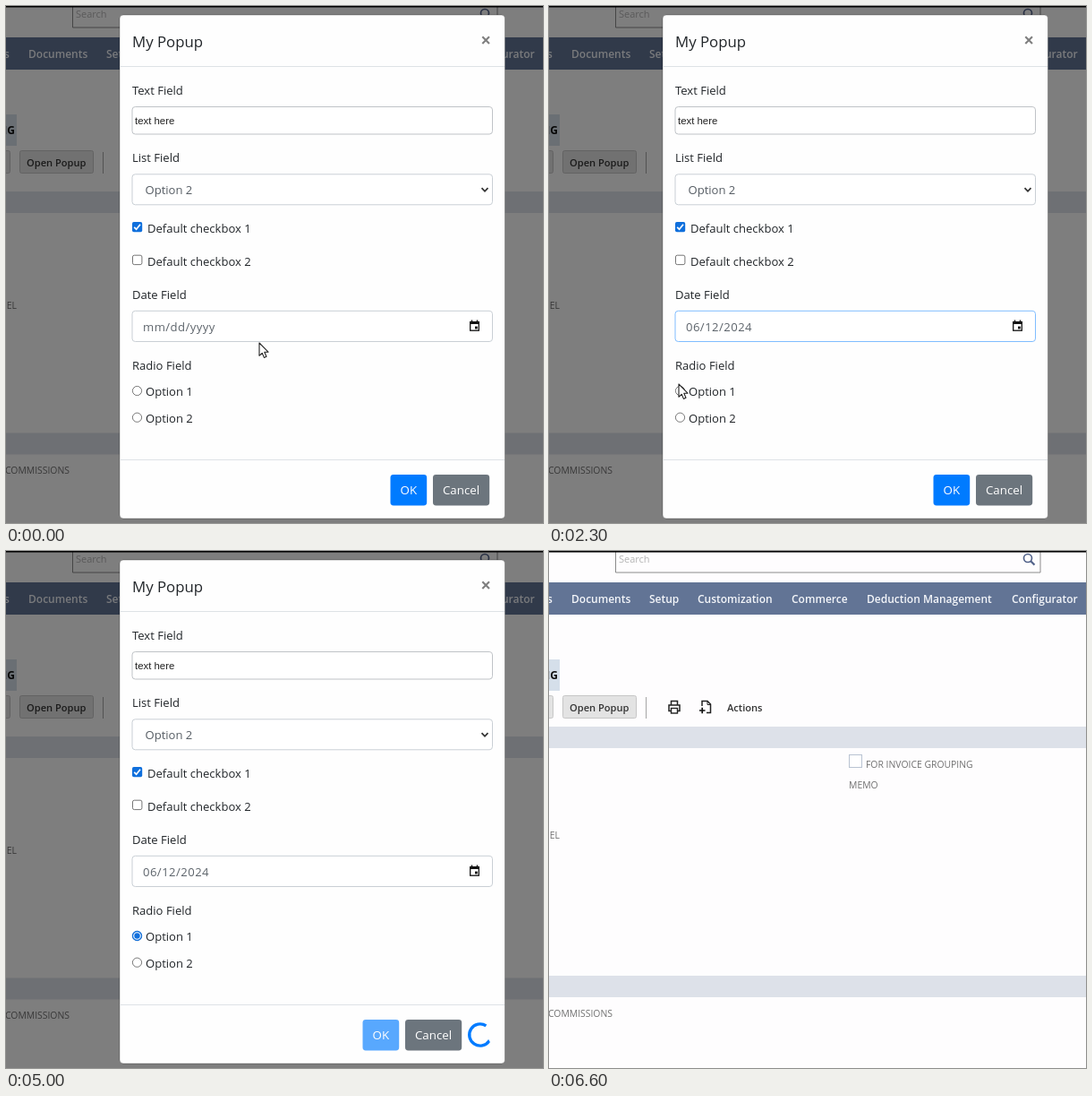
These frames come from a looping animation (600 px wide and 577 px high, 7.4 s). An HTML page:

```html
<!DOCTYPE html>
<html lang="en">
<head>
<meta charset="utf-8">
<title>Popup form</title>
<style>
  html, body { margin: 0; width: 100%; height: 100%; overflow: hidden; background: #fff; }
  svg { display: block; width: 600px; height: 577px; }
  text { white-space: pre; font-family: "Open Sans", "Noto Sans", sans-serif; }
  .end { text-anchor: end; }
  .mid { text-anchor: middle; }
  .nav { font-size: 12px; font-weight: 600; fill: #f4f6fa; }
  .tool { font-size: 11.1px; font-weight: 600; fill: #333; }
  .cap { font-size: 10.4px; fill: #707070; }
  .tab { font-size: 12px; font-weight: 700; fill: #111; }
  .search { font-size: 11px; fill: #b4b4b4; }
  .lbl { font-size: 13.05px; fill: #212529; }
  .val { font-size: 13.05px; fill: #565d64; }
  .date { font-size: 13.1px; letter-spacing: .45px; fill: #5d646b; }
  .title { font-size: 16.8px; font-weight: 500; fill: #212529; }
  .btn { font-size: 13.3px; fill: #fff; }
  .arial { font: 11.4px "Liberation Sans", Arial, sans-serif; fill: #222; }
  .day { font: 10.8px "Liberation Sans", Arial, sans-serif; fill: #111; text-anchor: middle; }
  .out { fill: #858585; }
  .month { font: bold 10.6px "Liberation Sans", Arial, sans-serif; fill: #111; }
</style>
</head>
<body>
<svg id="stage" viewBox="0 0 600 577"></svg>
<script>
const LOOP = 7400, STEP = 100;
const OPEN = 600, PICK = 1400, CLOSE = 1600, BLUR = 2300, CHECK = 2400,
      SEND = 3400, FREEZE = 5800, RELOAD = 6100, HEADER = 6200, READY = 6300;

const text = (x, y, s, cls, extra = '') => `<text x="${x}" y="${y}" class="${cls}" ${extra}>${s}</text>`;
const rect = (x, y, w, h, fill, extra = '') =>
  `<rect x="${x}" y="${y}" width="${w}" height="${h}" fill="${fill}" ${extra}/>`;
const line = (d, color, w = 1, extra = '') =>
  `<path d="${d}" fill="none" stroke="${color}" stroke-width="${w}" ${extra}/>`;
const group = (id, body, extra = '') => `<g id="${id}" ${extra}>${body}</g>`;
const field = (y, h, color, id = '') =>
  rect(141, y, 402.5, h, '#fff', `rx="3.4" stroke="${color}" ${id && `id="${id}"`}`);
const radio = y => `<circle cx="146.5" cy="${y}" r="5.1" fill="#fff" stroke="#767676"/>`;

function page() {
  const menu = [[-2, 's'], [25, 'Documents'], [112, 'Setup'], [166, 'Customization'],
    [271, 'Commerce'], [355, 'Deduction Management'], [517, 'Configurator']];
  const printer = line('M136.5 171.5V167.5H143.5V171.5M136.5 178.5H134V172H146V178.5H143.5', '#222', 1.5) +
    rect(136.5, 175.5, 7, 5.5, '#fff', 'stroke="#222" stroke-width="1.4"');
  const sheet = line('M171 173V167.5H177L180.5 171V180.5H176', '#222', 1.5) +
    line('M177 167.5V171.5H180.5', '#222') + line('M168 178H174.5M171.2 174.7V181.3', '#111', 1.7);
  const header = line('M74.5 0V24H549V0', '#8b8b8b') + text(78, 12.5, 'Search', 'search') +
    `<circle cx="535" cy="8" r="4.5" fill="none" stroke="#52638a" stroke-width="1.7"/>` +
    line('M538.2 11.2L542.5 15.5', '#52638a', 2.2) +
    menu.map(([x, s]) => text(x, 58, s, 'nav')).join('');
  return rect(0, 0, 600, 577, '#fefdfe') + rect(0, 35, 600, 36, '#627495') +
    group('header', header) +
    rect(-5, 121, 17, 35, '#d5dfea') + text(10, 143, 'BILLING', 'tab end') +
    rect(-20, 161.5, 24.5, 25, '#e3e3e3', 'rx="2" stroke="#c6c6c6"') +
    rect(15.5, 161.5, 82, 25, '#e3e3e3', 'rx="2" stroke="#c6c6c6"') +
    text(23, 178.5, 'Open Popup', 'tool') + line('M108.5 163V187', '#a5a5a5') +
    printer + sheet + text(199, 178.5, 'Actions', 'tool') +
    rect(0, 196, 600, 24, '#dde1e9', 'id="bar"') +
    group('loading', text(71, 242, 'SALES REP', 'cap') + text(71, 281.5, 'CLASS', 'cap') +
      text(71, 321, 'SALES CHANNEL', 'cap')) +
    group('ready', text(12, 321, 'SALES CHANNEL', 'cap end', 'id="channel"') +
      group('lower', rect(0, 474, 600, 24, '#dde1e9') + text(71, 519.5, 'COMMISSIONS', 'cap end')) +
      rect(335.5, 227.5, 14, 14, '#fff', 'stroke="#b9c3d2"') +
      text(354, 242, 'FOR INVOICE GROUPING', 'cap') + text(335, 265, 'MEMO', 'cap'));
}

function form() {
  const tick = rect(141, 241, 11.2, 11.2, '#0f6fdc', 'rx="1.8"') +
    line('M143.2 246.8L145.6 249.2L150 243.8', '#fff', 1.7);
  const icon = rect(518.7, 352.6, 9.6, 9.6, '#fff', 'stroke="#111" stroke-width="1.3"') +
    rect(518, 352, 11, 3, '#111') + line('M520.5 350.6V353M526.5 350.6V353', '#111', 1.4) +
    rect(524, 357.6, 2.8, 2.8, '#111');
  const button = (id, x, w, mid, s, fill) => group(id,
    rect(x, 523, w, 34.5, fill, 'rx="3.4"') + text(mid, 545, s, 'btn mid'));
  return rect(127, 10, 430.5, 562, '#fefefe', 'rx="4" stroke="#000" stroke-opacity=".25"') +
    text(141, 45.5, 'My Popup', 'title') +
    line('M532.3 34.3L540 42M540 34.3L532.3 42', '#7f7f7f', 2.1) +
    line('M127.5 67.5H557M127.5 506.5H557', '#dee2e6') +
    text(141, 99, 'Text Field', 'lbl') + field(112.5, 30.5, '#bfc3c7') + text(144, 131.7, 'text here', 'arial') +
    text(141, 174, 'List Field', 'lbl') + field(187.8, 34, '#c9cfd5') + text(155.5, 210, 'Option 2', 'val') +
    line('M531.5 203.2L535 206.8L538.5 203.2', '#333', 1.8) +
    tick + text(158, 253, 'Default checkbox 1', 'lbl') +
    rect(141.5, 278.2, 10.4, 10.4, '#fff', 'rx="1.8" stroke="#767676"') + text(158, 290, 'Default checkbox 2', 'lbl') +
    text(141, 327, 'Date Field', 'lbl') +
    rect(139.3, 338.3, 405.9, 37.7, 'none', 'id="ring" rx="5" stroke="#bfdeff" stroke-width="2.8"') +
    field(340.3, 34.2, '#c9cfd5', 'date') + rect(152, 347, 26, 20.5, '#2b79c9', 'id="mark"') +
    group('blank', text(153, 362.5, '<tspan id="mm">mm</tspan>/dd/yyyy', 'date')) +
    text(153, 362.5, '06/12/2024', 'date', 'id="filled"') + icon +
    text(141, 406, 'Radio Field', 'lbl') + radio(429.5) + radio(459.2) +
    group('dot', `<circle cx="146.5" cy="429.5" r="5" fill="#fff" stroke="#0f6fdc" stroke-width="1.3"/>
      <circle cx="146.5" cy="429.5" r="3.2" fill="#0f6fdc"/>`) +
    text(156, 435, 'Option 1', 'lbl') + text(156, 464.7, 'Option 2', 'lbl') +
    group('buttons', button('ok', 429.5, 40.7, 449.8, 'OK', '#007bff') +
      button('cancel', 477, 63.2, 508.5, 'Cancel', '#6c757d')) +
    `<circle id="spin" cx="529.8" cy="540" r="12.1" fill="none" stroke="#007bff"
      stroke-width="3.4" pathLength="4" stroke-dasharray="3 1"/>`;
}

function calendar() {
  const colX = i => 162.6 + 24.2 * i;
  let s = rect(141.5, 375.5, 187, 215, '#fff', 'rx="4" stroke="#c4c4c4" filter="url(#soft)"') +
    text(150.5, 399.2, 'June 2024', 'month') + '<path d="M204 394H210L207 397.8Z" fill="#111"/>' +
    line('M280 404V389M274.2 395L280 389L285.8 395M307.5 389V404M301.7 398L307.5 404L313.3 398', '#333', 1.2) +
    rect(295.8, 495.3, 24, 24, '#fff', 'stroke="#757575"') +
    rect(223.7, 495.5, 23, 23.6, '#0b78f4', 'id="picked" stroke="#0a0a14" stroke-width="2"');
  'Su Mo Tu We Th Fr Sa'.split(' ').forEach((d, i) => s += text(colX(i), 433, d, 'day'));
  for (let i = 0; i < 35; i++) {
    const n = i - 5, y = 460 + 25.7 * Math.floor(i / 7);
    s += text(colX(i % 7), y, n < 1 ? n + 31 : n, n < 1 ? 'day out' : 'day', `id="d${i}"`);
  }
  return s;
}

const arrow = '<path d="M0 0V14.3L3.2 11.3L5.4 16.4L8 15.2L5.8 10.3L10 10.2Z" fill="#fff" stroke="#222" stroke-width="1.1" stroke-linejoin="round"/>';
const hand = `<path d="M-1.6 1.4Q0 -1 1.6 1.4V7Q3.5 5.7 4.6 7.5Q6.2 6.6 7.2 8.2Q9 7.7 9.3 9.8V14Q9 17 7.4 20H-1
  Q-3.5 16-5.8 12.6Q-6 10-3.4 11L-1.6 13Z" fill="#fff" stroke="#222" stroke-width="1.1" stroke-linejoin="round"/>
  ${line('M1.6 7V11M4.6 7.5V11M7.2 8.2V11', '#222', .9)}`;

const stage = document.getElementById('stage');
stage.innerHTML = `<defs><filter id="soft" x="-10%" y="-10%" width="120%" height="120%">
  <feDropShadow dx="0" dy="1" stdDeviation="2" flood-opacity=".22"/></filter></defs>` +
  page() + group('popup', rect(0, 0, 600, 577, '#000', 'fill-opacity=".5"') + form() +
    group('calendar', calendar()) +
    group('cursor', group('arrow', arrow) + group('hand', hand))) +
  rect(0, 0, 600, 1.5, '#000');

const el = {};
stage.querySelectorAll('[id]').forEach(n => el[n.id] = n);
const show = (id, on) => el[id].setAttribute('display', on ? 'inline' : 'none');
const move = (id, x, y) => el[id].setAttribute('transform', `translate(${x} ${y})`);
const set = (n, k, v) => n.setAttribute(k, v);

// time, x, y of the pointer tip
const route = [[0, 283, 376], [500, 522, 356], [700, 522, 356], [1300, 233, 507], [1600, 233, 507],
  [2200, 145, 422], [2500, 145, 422], [3200, 455, 550], [3700, 455, 550], [4100, 456, 600]];

function pointer(t) {
  const i = route.findIndex(p => p[0] > t);
  if (i < 0) return route[route.length - 1].slice(1);
  const [t0, x0, y0] = route[i - 1], [t1, x1, y1] = route[i];
  const u = (t - t0) / (t1 - t0), e = u * u * (3 - 2 * u);
  return [x0 + (x1 - x0) * e, y0 + (y1 - y0) * e];
}

function draw(t) {
  const modal = t < RELOAD, busy = t >= SEND;
  show('popup', modal);
  show('header', modal || t >= HEADER);
  show('loading', !modal && t < READY);
  show('ready', modal || t >= READY);
  move('bar', 0, modal ? 11 : 0);
  move('channel', 0, modal ? 16.5 : 0);
  move('lower', 0, modal ? 2.5 : 0);
  if (!modal) return;

  const focus = t >= OPEN && t < BLUR, filled = t >= CLOSE;
  show('ring', focus);
  set(el.date, 'stroke', t >= OPEN && t < CHECK ? '#80bdff' : '#c9cfd5');
  show('mark', focus && !filled);
  set(el.mm, 'fill', focus ? '#fff' : '#5d646b');
  show('blank', !filled);
  show('filled', filled);
  show('calendar', t >= OPEN && t < CLOSE);
  show('picked', t >= PICK);
  el.d17.style.fill = t >= PICK ? '#fff' : '';
  show('dot', t >= CHECK);

  const [x, y] = pointer(t);
  const over = y > 523 && y < 558 && x > 430 && x < 540;
  move('cursor', x, y);
  show('arrow', !over && y < 558);
  show('hand', over || y >= 558);
  move('buttons', busy ? -31 : 0, 0);
  set(el.ok, 'opacity', busy ? .65 : 1);
  set(el.ok.firstChild, 'fill', over && !busy ? '#0069d9' : '#007bff');
  set(el.cancel.firstChild, 'fill', over && busy ? '#5a6268' : '#6c757d');
  show('spin', busy);
  const turn = 90 + (Math.min(t, FREEZE) - 3700) * .51;
  set(el.spin, 'transform', `rotate(${turn % 360} 529.8 540)`);
}

const start = performance.now();
function tick() {
  const t = (performance.now() - start) % LOOP;
  draw(Math.floor(t / STEP) * STEP);
  requestAnimationFrame(tick);
}
tick();
</script>
</body>
</html>
```
